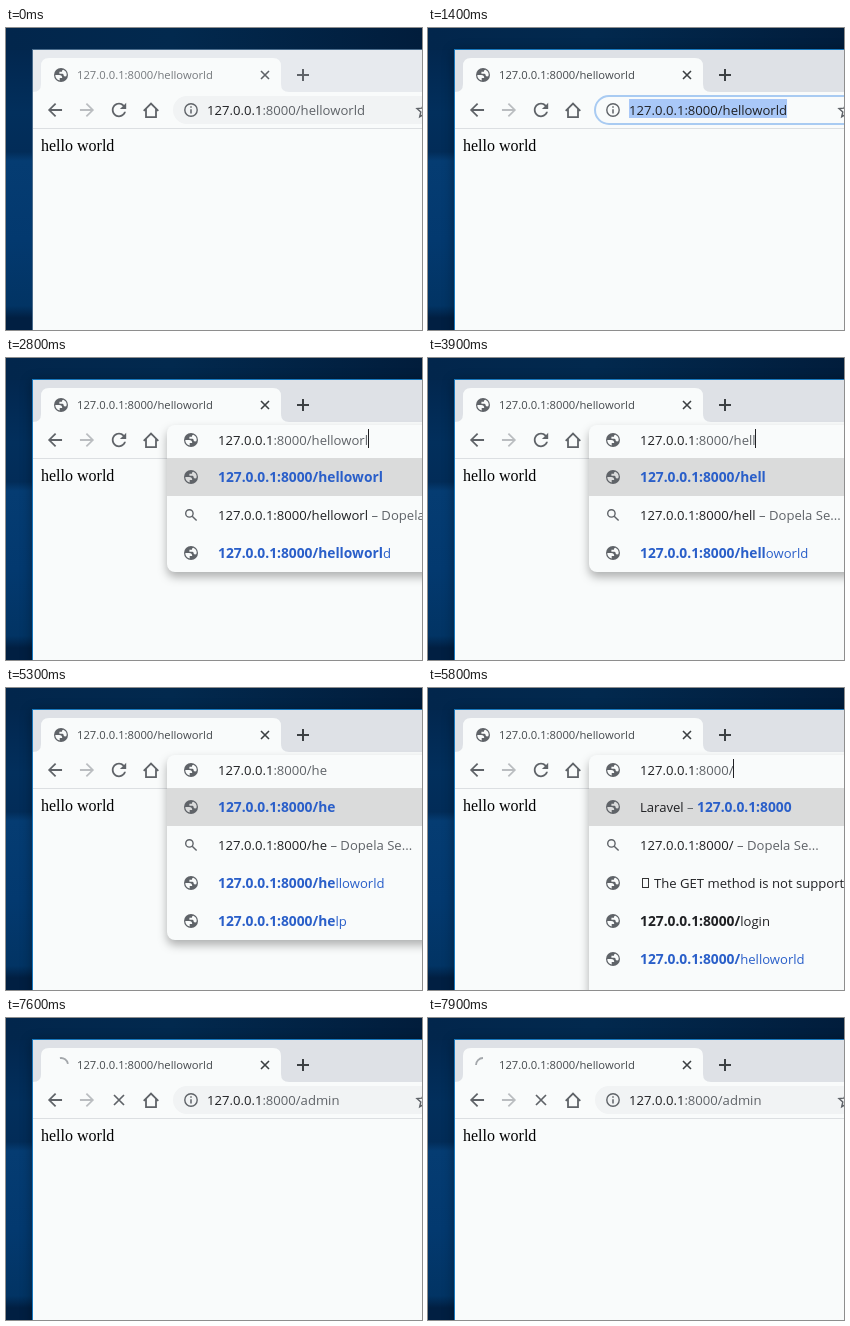
Animation of 416x302 px, one loop 8000 ms. Source, as an HTML page:

```html
<!DOCTYPE html>
<html lang="en">
<head>
<meta charset="utf-8">
<title>Editing an address</title>
<style>
  html, body { margin: 0; width: 100%; height: 100%; overflow: hidden; background: #022a58; }
  svg { display: block; }
  text { font: 13.1px "Open Sans", "Noto Sans", sans-serif; fill: #202124; white-space: pre; }
  .page { font: 16px "Liberation Serif", serif; fill: #000; }
  .title { font-size: 11.25px; fill: #45494d; }
  .grey { fill: #5f6368; }
  .blue { fill: #2a5fc9; }
  .bold { font-weight: 700; font-size: 13.8px; }
  .icon { fill: #5f6368; }
  .line { fill: none; stroke: #5f6368; stroke-width: 2; }
  .frame { fill: #1878bd; filter: drop-shadow(0 2px 6px rgba(0, 0, 0, .35)); }
  .strip { fill: #dee1e6; }
  .tab-mark { fill: none; stroke: #3c4043; stroke-width: 1.6; }
  .surface { fill: #f9fbfb; }
  .pill { fill: #f1f3f4; }
  .popup { fill: #f9fbfb; filter: drop-shadow(0 5px 5px rgba(0, 0, 0, .3)); }

  .inactive .frame { fill: #4a6c8c; filter: none; }
  .inactive .strip { fill: #e7eaee; }
  .inactive .title { fill: #75797d; }
  .inactive .tab-mark { stroke: #5f6368; }
  .focused .pill { fill: #f9fbfb; stroke: #a9cbf2; stroke-width: 2; }

  .list, .loading-only { display: none; }
  .editing .list { display: inline; }
  .editing .bar { display: none; }
  .loading .loading-only { display: inline; }
  .loading .idle-only { display: none; }
</style>
</head>
<body>
<svg id="stage" width="416" height="302" viewBox="0 0 416 302">
  <defs>
    <linearGradient id="sky" x2="0" y2="1">
      <stop offset="0" stop-color="#02244a"/>
      <stop offset=".28" stop-color="#022f5c"/>
      <stop offset=".41" stop-color="#022c58"/>
      <stop offset=".44" stop-color="#053c72"/>
      <stop offset=".7" stop-color="#03396f"/>
      <stop offset=".92" stop-color="#023464"/>
      <stop offset=".96" stop-color="#011f42"/>
      <stop offset="1" stop-color="#011f42"/>
    </linearGradient>
    <linearGradient id="horizon">
      <stop offset="0" stop-color="#02264c"/>
      <stop offset=".4" stop-color="#02294e"/>
      <stop offset="1" stop-color="#011d3c"/>
    </linearGradient>
    <path id="globe" fill-rule="evenodd" d="M0-7A7 7 0 0 1 0 7 7 7 0 0 1 0-7z
      M-5.7 0A5.7 5.7 0 0 0-1.3 5.5V3H1.2Q1.2 0-1.8 0z
      M-1.6-1.2V-3.2H.9Q.9-5.2 2.3-5.3A5.7 5.7 0 0 1 5.7 0Q5.5 1.5 4 1.5 2.5 1.4 2.5-.2 2.5-1.2 1.2-1.2z"/>
    <path id="arrow" transform="scale(.88) translate(-12 -12)" d="M20 11H7.83l5.59-5.59L12 4l-8 8 8 8 1.41-1.41L7.83 13H20z"/>
    <g id="search" fill="none" stroke="#5f6368" stroke-width="1.4">
      <circle cx="-1.6" cy="-1.6" r="3.7"/>
      <path d="M1.2 1.2L5.6 5.6"/>
    </g>
  </defs>

  <rect width="416" height="302" fill="url(#sky)"/>
  <rect width="416" height="22" fill="url(#horizon)"/>

  <rect class="frame" x="26" y="21" width="420" height="320"/>
  <rect class="strip" x="27" y="22" width="389" height="43"/>
  <path class="surface" d="M27 64q8 0 8-8V38q0-8 8-8h224q8 0 8 8v18q0 8 8 8H416V302H27z"/>
  <path d="M27 100.5H416" stroke="#dcdfe2"/>

  <use class="icon idle-only" href="#globe" x="55" y="47"/>
  <path class="loading-only" id="spinner" d="M48 47A7 7 0 0 1 55 40" fill="none" stroke="#a3a7ab" stroke-width="1.8"/>
  <text class="title" x="71" y="51">127.0.0.1:8000/helloworld</text>
  <path class="tab-mark" d="M255 43l8 8m0-8l-8 8"/>
  <path class="tab-mark" d="M291 47h12m-6-6v12" style="stroke-width:2"/>

  <use class="icon" href="#arrow" x="49" y="82"/>
  <use href="#arrow" transform="translate(81 82) scale(-1 1)" fill="#babdc0"/>
  <path class="icon idle-only" transform="translate(113 82) scale(.9) translate(-12 -12)" d="M17.65 6.35C16.2 4.9 14.21 4 12 4c-4.42 0-7.99 3.58-7.99 8s3.57 8 7.99 8c3.73 0 6.84-2.55 7.73-6h-2.08c-.82 2.33-3.04 4-5.65 4-3.31 0-6-2.69-6-6s2.69-6 6-6c1.66 0 3.14.69 4.22 1.78L13 11h7V4z"/>
  <path class="line loading-only" d="M108 77l10 10m0-10l-10 10" style="stroke-width:1.7"/>
  <path class="line" d="M137.7 82.8l7.3-7.3 7.3 7.3M140 81v8.2h10V81" style="stroke-width:1.8"/>

  <g class="bar">
    <rect class="pill" x="167" y="68" width="300" height="28" rx="14"/>
    <circle class="line" cx="185" cy="82" r="6.2" style="stroke-width:1.4"/>
    <path class="line" d="M185 78.2v1.6m0 1.4v4.4" style="stroke-width:1.5"/>
    <path class="line" d="M418 75.5l2 4.6 5 .5-3.8 3.3 1.1 4.9-4.3-2.6-4.3 2.6 1.1-4.9-3.8-3.3 5-.5z" style="stroke-width:1.4"/>
  </g>

  <text class="page" x="35" y="123">hello world</text>

  <g class="list">
    <rect class="popup" id="popup" x="161" y="67" width="300" rx="8"/>
    <rect x="161" y="100" width="255" height="38" fill="#dadbdb"/>
    <use class="icon" href="#globe" x="185" y="82"/>
    <g id="rows"></g>
  </g>

  <rect id="selection" y="71" height="19" fill="#a9c8f8"/>
  <text id="address" y="87"></text>
  <rect id="caret" y="71" width="1" height="19" fill="#202124"/>
</svg>

<script>
  const DURATION = 8000;
  const HOST = '127.0.0.1';
  const BASE = HOST + ':8000/';
  const $ = id => document.getElementById(id);

  const span = (text, style = '') => `<tspan class="${style}">${text}</tspan>`;

  // Suggestion rows: icon, markup, and whether a missing-glyph box leads the text.
  const plain = markup => ({ icon: 'globe', markup });
  const typedUrl = path => plain(span(BASE + path, 'bold blue'));
  const searchFor = path => ({
    icon: 'search',
    markup: span(BASE + path) + span(' – Dopela Se...', 'grey')
  });
  const visited = (path, full, color = 'blue') =>
    plain(span(BASE + path, 'bold ' + color) + span(full.slice(path.length), color));
  const errorPage = {
    icon: 'globe',
    markup: span('The GET method is not supported for this route.'),
    box: true
  };

  const matches = (path, ...pages) =>
    [typedUrl(path), searchFor(path), ...pages.map(page => visited(path, page))];
  const completed = path => [errorPage, searchFor(path)];
  const rootRows = [
    plain(span('Laravel') + span(' – ', 'grey') + span(BASE.slice(0, -1), 'bold blue')),
    searchFor(''),
    errorPage,
    visited('', 'login', ''),
    visited('', 'helloworld'),
    visited('', 'help')
  ];

  // selected: count of highlighted characters at the end of the address
  const step = (at, look, path, options = {}) =>
    ({ at, look, path, selected: 0, caret: false, rows: [], ...options });
  const edit = (at, path, rows, caret = true) => step(at, 'editing', path, { rows, caret });
  const complete = (at, typed) =>
    step(at, 'editing', 'admin', { rows: completed(typed), selected: 5 - typed.length });

  const steps = [
    step(0, 'inactive', 'helloworld'),
    step(1400, 'focused', 'helloworld', { selected: BASE.length + 10 }),
    step(2400, 'focused', 'helloworld', { caret: true }),
    ...[[2700, 9], [2900, 8], [3100, 7], [3300, 6], [3500, 5], [3900, 4]].map(([at, length]) => {
      const path = 'helloworld'.slice(0, length);
      return edit(at, path, matches(path, 'helloworld'));
    }),
    edit(4400, 'hel', matches('hel', 'helloworld', 'help')),
    edit(4800, 'he', matches('he', 'helloworld', 'help')),
    edit(5300, 'he', matches('he', 'helloworld', 'help'), false),
    edit(5600, 'h', matches('h', 'helloworld', 'help', 'home')),
    edit(5800, '', rootRows),
    complete(6200, 'a'),
    complete(6300, 'ad'),
    complete(6400, 'adm'),
    edit(6600, 'admin', completed('admin')),
    edit(7100, 'admin', completed('admin'), false),
    step(7600, 'loading', 'admin')
  ];

  function rowMarkup({ icon, markup, box }, index) {
    const y = 119 + 38 * index;
    const glyph = box
      ? `<rect x="214.5" y="${y - 4.5}" width="6" height="9" fill="none" stroke="#333"/>` : '';
    return `<use class="icon" href="#${icon}" x="185" y="${y}"/>${glyph}
      <text x="${box ? 226 : 212}" y="${y + 5}">${markup}</text>`;
  }

  function show({ look, path, selected, caret, rows }) {
    const left = look === 'editing' ? 212 : 201;
    const address = $('address');
    const rest = (BASE + path).slice(HOST.length);
    const plainEnd = Math.max(0, rest.length - selected);

    $('stage').setAttribute('class', look);
    address.setAttribute('x', left);
    address.innerHTML = span(HOST) + span(rest.slice(0, plainEnd), 'grey') + span(rest.slice(plainEnd));

    const total = address.getComputedTextLength();
    const start = BASE.length + path.length - selected;
    const startX = start ? address.getSubStringLength(0, start) : 0;
    $('selection').setAttribute('x', left + startX);
    $('selection').setAttribute('width', selected ? total - startX : 0);
    $('caret').setAttribute('x', Math.floor(left + total));
    $('caret').style.display = caret ? '' : 'none';

    $('popup').setAttribute('height', 33 + 38 * rows.length);
    $('rows').innerHTML = rows.map(rowMarkup).join('');
  }

  let current;
  function tick(now) {
    const time = now % DURATION;
    const next = steps.findLast(({ at }) => at <= time);
    if (next !== current) show(current = next);
    const turn = 27 * (79 - Math.floor(time / 100));
    $('spinner').setAttribute('transform', `rotate(${turn} 55 47)`);
    requestAnimationFrame(tick);
  }
  tick(performance.now());
</script>
</body>
</html>
```
